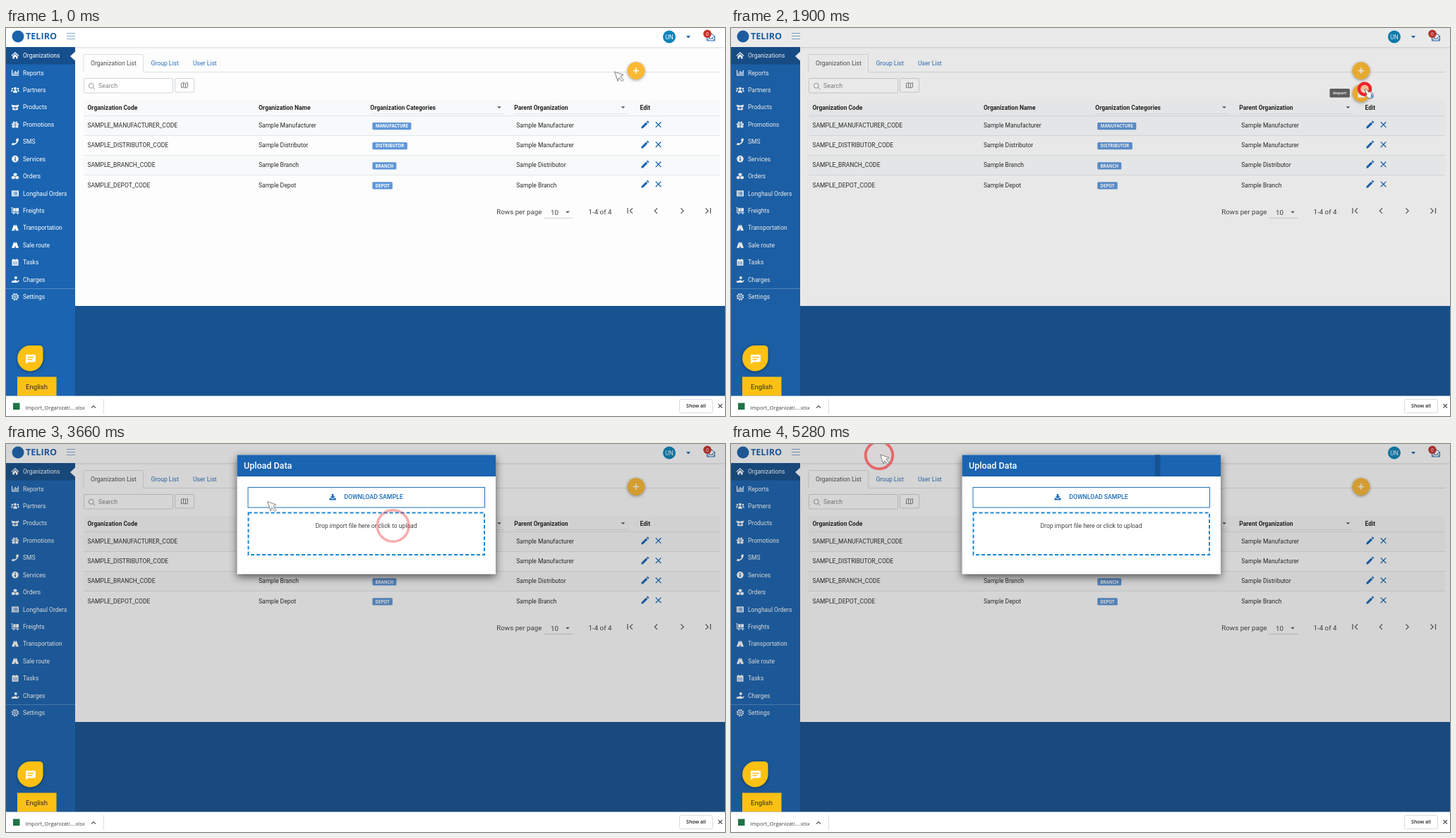
Write an HTML page that moves like this. It is 1019 by 550 pixels and loops after 5330 ms.

```html
<!DOCTYPE html>
<html lang="en">
<head>
<meta charset="utf-8">
<title>Organization import</title>
<style>
html, body { margin: 0; width: 100%; height: 100%; overflow: hidden; background: #fff; }
svg { display: block; width: 1019px; height: 550px; }
text { font: 8.5px Roboto, sans-serif; fill: #2b2b2b; white-space: pre; }
.bold { font-weight: 700; fill: #222; }
.white { fill: #fff; }
.link { fill: #2a70b8; }
.tag { font: 700 6.1px "Open Sans", sans-serif; fill: #fff; }
.page { font-size: 9.75px; fill: #444; }
.win { font: 7px "Open Sans", sans-serif; fill: #222; }
.soft { fill: #777; }
.mid { text-anchor: middle; }
.line { fill: none; stroke: #555; stroke-width: 1.2; }
.drop { filter: drop-shadow(0 1px 2px #0006); }

.loop { animation: 5330ms linear infinite; }
#cursor { animation-name: move; }
#arrow { animation-name: arrow; animation-timing-function: step-end; }
#hand { animation-name: hand; animation-timing-function: step-end; }
#plus { animation-name: plus; transform-origin: 893px 60.5px; }
#pen { animation-name: pen; transform-origin: 893px 60.5px; }
#fileBtn { animation-name: fileBtn; transform-origin: 893px 92.5px; }
#tip { animation-name: tip; transform-origin: 877px 92px; }
#shade { animation-name: shade; }
#modal { animation-name: modal; }
#modalHead { animation-name: head; animation-timing-function: step-end; }
#strip { animation-name: strip; animation-timing-function: step-end; }
#dialog { animation-name: dialog; transform-origin: 307px 171px; }
#lastClick { animation-name: lastClick; animation-timing-function: step-end; }
.ring { fill: #ffd0d0; stroke: #f0262c; opacity: 0; animation-name: ring; }

@keyframes move {
  0%, .75% { transform: translate(862px, 62px); animation-timing-function: ease-in-out; }
  10.69%, 21.39% { transform: translate(898px, 62px); animation-timing-function: ease-in-out; }
  25.89%, 37.9% { transform: translate(898px, 86px); animation-timing-function: ease-in; }
  43.71% { transform: translate(622px, 111px); animation-timing-function: ease-out; }
  48.03%, 63.41% { transform: translate(548px, 116px); animation-timing-function: ease-in; }
  68.67% { transform: translate(371px, 82px); animation-timing-function: ease-out; }
  73.17%, 100% { transform: translate(211px, 15px); }
}
@keyframes arrow { 0% { opacity: 1; } 6% { opacity: 0; } 39% { opacity: 1; } }
@keyframes hand { 0% { opacity: 0; } 6% { opacity: 1; } 39% { opacity: 0; } }
@keyframes plus {
  0%, 6.2% { opacity: 1; transform: none; }
  9%, 30.4% { opacity: 0; transform: rotate(45deg); }
  32.8%, 100% { opacity: 1; transform: none; }
}
@keyframes pen {
  0%, 6.2% { opacity: 0; transform: rotate(-45deg); }
  9%, 30.4% { opacity: 1; transform: none; }
  32.8%, 100% { opacity: 0; transform: rotate(-45deg); }
}
@keyframes fileBtn {
  0%, 8.5% { opacity: 0; transform: scale(0); }
  12.5%, 38% { opacity: 1; transform: none; }
  41%, 100% { opacity: 0; transform: scale(0); }
}
@keyframes tip {
  0%, 11.44% { opacity: 0; transform: scale(.4); }
  14.2%, 36.6% { opacity: 1; transform: none; }
  38.5%, 100% { opacity: 0; transform: scale(.4); }
}
@keyframes shade { 0%, 33.77% { opacity: 0; } 37.52%, 100% { opacity: 1; } }
@keyframes modal {
  0%, 37.5% { opacity: 0; transform: translateY(-42px); animation-timing-function: ease-out; }
  42.2%, 100% { opacity: 1; transform: none; }
}
@keyframes head { 0% { fill: #1a64b1; } 69.6% { fill: #1b6cc4; } 93.5% { fill: #1a64b1; } }
@keyframes strip { 0% { opacity: 0; } 94.6%, 100% { opacity: 1; } }
@keyframes dialog {
  0%, 69.6% { opacity: 0; transform: scale(.92); animation-timing-function: ease-out; }
  73.2%, 92.5% { opacity: 1; transform: none; animation-timing-function: ease-in; }
  96%, 100% { opacity: 0; transform: scale(.95); }
}
@keyframes ring {
  0% { r: 1.5px; stroke-width: 3px; opacity: 1; fill-opacity: .6; }
  6.19% { r: 8px; stroke-width: 4.6px; opacity: 1; fill-opacity: .6; }
  14.26% { r: 18.3px; stroke-width: 4px; opacity: .7; fill-opacity: .1; }
  18.2% { r: 22.3px; stroke-width: 3.6px; opacity: .38; fill-opacity: 0; }
  21.2%, 100% { r: 26px; stroke-width: 3.4px; opacity: 0; fill-opacity: 0; }
}
@keyframes lastClick { 0% { visibility: hidden; } 83.8%, 100% { visibility: visible; } }
</style>
</head>
<body>
<svg viewBox="0 0 1019 550">
  <defs>
    <path id="pencil" d="M-5 5V2.8L1.6-3.8L3.8-1.6L-2.8 5ZM2.3-4.5l1-1q.5-.5 1 0l1.2 1.2q.5.5 0 1l-1 1z"/>
    <path id="caret" d="M-2.8-1.3H2.8L0 1.5Z" fill="#555"/>
    <clipPath id="nav"><rect width="98" height="342"/></clipPath>
  </defs>

  <rect width="1019" height="550" fill="#fdfdfd"/>
  <rect x="98" y="394" width="921" height="128" fill="#175291"/>

  <!-- top bar -->
  <rect class="drop" width="1019" height="27" fill="#fff" style="filter:drop-shadow(0 1px 1px #0002)"/>
  <circle cx="17" cy="12" r="8.5" fill="#1b62ad"/>
  <text x="28" y="16.4" style="font:700 12.6px 'Open Sans',sans-serif;fill:#1b62ad">TELIRO</text>
  <path d="M86 7.5h12M86 11.5h12M86 15.5h12" stroke="#86abd2"/>
  <circle cx="940" cy="12.5" r="9" fill="#0b84bb"/>
  <text class="white mid" x="940" y="15.7">UN</text>
  <path d="M964 11h6l-3 3.4z" fill="#1b62ad"/>
  <path d="M993.5 11.5l5.5-4 5.5 4v6.5h-11zl5.5 4.3 5.5-4.3M993.5 18l4-4M1004.500 18l-4-4" fill="#fff" stroke="#1b62ad"/>
  <circle cx="994" cy="8.3" r="5.7" fill="#c62f2b"/>
  <text class="white mid" x="994" y="10.800" style="font-size:7px">0</text>

  <!-- side menu -->
  <rect y="27" width="98" height="495" fill="#1a64b1"/>
  <rect y="27" width="98" height="24.500" fill="#154f8e"/>
  <path d="M98.500 33l-7.500 7 7.500 7z" fill="#fdfdfd"/>
  <path d="M0 369.500h98" stroke="#4f8bc9"/>
  <g id="menu" fill="#fff" fill-rule="evenodd"></g>

  <!-- tabs and search -->
  <path d="M194.500 62.500H1012M110 62.500V39q0-1.500 1.500-1.500H193q1.500 0 1.500 1.500V62.500" fill="none" stroke="#dcdfe3"/>
  <text x="120" y="52.600" style="font-size:8.650px;fill:#495057">Organization List</text>
  <text class="link" x="205.500" y="52.600" style="font-size:8.650px">Group List</text>
  <text class="link" x="265" y="52.600" style="font-size:8.650px">User List</text>
  <rect x="110.500" y="71.500" width="126" height="20.500" rx="1.500" fill="#fff" stroke="#cfd4d9"/>
  <g fill="none" stroke="#999"><circle cx="120.800" cy="81.800" r="3.500"/><path d="M123.300 84.300l3 3"/></g>
  <text x="131" y="85" style="font-size:8.800px;fill:#858585">Search</text>
  <rect x="239.500" y="71.500" width="27" height="19.500" rx="1.500" fill="#fff" stroke="#cfd4d9"/>
  <path d="M248.500 78.500l3-1 3 1 3-1v6.500l-3 1-3-1-3 1zM251.500 77.500v6.500M254.500 78.500v6.500" fill="none" stroke="#777" stroke-width=".9"/>

  <!-- table -->
  <rect x="110" y="102" width="902" height="22" fill="#f8f9fa"/>
  <g class="bold">
    <text class="bold" x="115.500" y="115.600">Organization Code</text>
    <text class="bold" x="358" y="115.600">Organization Name</text>
    <text class="bold" x="516.300" y="115.600">Organization Categories</text>
    <text class="bold" x="720.300" y="115.600">Parent Organization</text>
    <text class="bold" x="898.500" y="115.600">Edit</text>
  </g>
  <path d="M516 121.500H706M720 121.500H882" stroke="#e6e6e6"/>
  <use href="#caret" x="699" y="112.500"/><use href="#caret" x="874.500" y="112.500"/>
  <g id="rows"></g>
  <path d="M110 124.500h902M110 152.500h902M110 180.500h902M110 208.500h902" stroke="#e2e6ea"/>

  <!-- pager -->
  <text class="page" x="695.300" y="263.500">Rows per page</text>
  <text class="page" x="772" y="264.600">10</text>
  <use href="#caret" x="796" y="261"/>
  <path d="M762 269.500h41" stroke="#d0d0d0"/>
  <text class="page" x="825.500" y="263.500">1-4 of 4</text>
  <path class="line" d="M881 255v8M888 255.500l-3.700 3.700 3.700 3.700M923 255.500l-3.700 3.700 3.700 3.700M956.500 255.500l3.700 3.700-3.700 3.700M991.500 255.500l3.700 3.700-3.700 3.700M998.500 255v8"/>

  <!-- floating buttons -->
  <g id="tip" class="loop">
    <rect x="848.500" y="86" width="28.500" height="12.500" rx="1.500" fill="#636363"/>
    <text class="tag mid" x="862.700" y="94.400" style="font-size:5.700px">Import</text>
  </g>
  <g id="fileBtn" class="loop">
    <circle class="drop" cx="893" cy="92.500" r="12.300" fill="#fbb832"/>
    <path d="M888.500 86.500h5.500l4 4v8h-9.500z" fill="#fff"/>
    <path d="M893.500 87v4h4" fill="none" stroke="#fbb832" stroke-width=".8"/>
  </g>
  <circle class="drop" cx="893" cy="60.500" r="12.300" fill="#fbb832"/>
  <path id="plus" class="loop" d="M888.800 60.500h8.400M893 56.300v8.400" stroke="#fff" stroke-width="1.500"/>
  <g id="pen" class="loop"><use href="#pencil" x="893" y="60.500" fill="#fff"/></g>

  <rect id="shade" class="loop" width="1019" height="522" fill="#262626" fill-opacity=".19"/>

  <!-- upload window -->
  <g id="modal" class="loop">
    <rect x="327.500" y="15.500" width="366.500" height="169" fill="#fefefe" style="filter:drop-shadow(0 4px 6px #0009)"/>
    <rect id="modalHead" class="loop" x="327.500" y="15.500" width="366.500" height="30.500"/>
    <rect id="strip" class="loop" x="601" y="15.500" width="7.500" height="30" fill="#175391"/>
    <text class="white" x="337" y="35" style="font-size:12.500px;font-weight:500">Upload Data</text>
    <rect x="343" y="61.500" width="335.500" height="28.500" fill="#fff" stroke="#1d74bd"/>
    <path d="M461.700 71h2.600v3.200h2.200l-3.500 3.400-3.500-3.400h2.200zM458.500 76.500h2l2.500 2 2.500-2h2v3h-9z" fill="#1a6cb8"/>
    <text class="link" x="479.300" y="78.300" style="font-size:8.700px;font-weight:500;fill:#1a6cb8">DOWNLOAD SAMPLE</text>
    <rect x="343.500" y="97.500" width="334.500" height="59.500" fill="#fff" stroke="#1a88d4" stroke-width="2" stroke-dasharray="5 3"/>
    <text class="mid" x="510.500" y="118.500" style="fill:#444">Drop import file here or click to upload</text>
  </g>

  <!-- file picker -->
  <g id="dialog" class="loop">
    <rect x="2.500" y="-40" width="610" height="382.500" fill="#fff" stroke="#555" style="filter:drop-shadow(1px 3px 5px #0008)"/>
    <rect x="3" y="37.500" width="95" height="14.500" fill="#d9d9d9"/>
    <path d="M98.500 0V296" stroke="#f1f1f1"/>
    <circle cx="22" cy="10.500" r="4.500" fill="#1a6fc9"/>
    <g fill="none" stroke="#888">
      <path d="M18.500 26.500h8v5.500h-8zM20 34h6M26.500 40v7M23.500 44.500l3 3 3-3M23 49h7"/>
      <path d="M23.500 55.500h6.500l1 4v4h-8.500v-4zM22.500 60h8.500M23.500 84.500h6.500l1 4v4h-8.500v-4zM22.500 89h8.500"/>
      <circle cx="26.500" cy="74" r="3" stroke-width="2.600"/>
      <circle cx="22" cy="108.500" r="4.200"/><path d="M18 108.500h8M22 104.500q-4 4 0 8q4-4 0-8"/>
      <path d="M18.500 123h7.500v9.500h-7.500z"/>
    </g>
    <g id="places" clip-path="url(#nav)"></g>
    <path d="M266.500 0v9M339.500 0v9M412.500 0v9M461.500 0v9" stroke="#e3e3e3"/>
    <rect x="108" y="12" width="351.500" height="13.500" fill="#e5f3fb"/>
    <rect x="111.500" y="14" width="9" height="9" fill="#1f7446"/>
    <g id="files"></g>
    <rect x="118.500" y="301.500" width="361" height="14" fill="#fff" stroke="#1a7bc9"/>
    <rect x="487" y="301.500" width="114.500" height="14" fill="#e3e3e3" stroke="#b0b0b0"/>
    <rect x="488" y="320" width="51.500" height="14" fill="#e1e1e1" stroke="#0f78d0" stroke-width="1.500"/>
    <rect x="548.500" y="320" width="52.500" height="14" fill="#e1e1e1" stroke="#b0b0b0"/>
    <path d="M471.500 307.500l2.500 2.500 2.500-2.500M593.500 307.500l2.500 2.500 2.500-2.500" fill="none" stroke="#555"/>
    <text class="win mid" x="513.500" y="329.500">Open</text>
    <text class="win mid" x="574.500" y="329.500">Cancel</text>
    <path d="M604 340.500h6M606.500 338h3.500M608.500 335.500h1.500" stroke="#aaa" stroke-dasharray="1.500 1"/>
  </g>

  <!-- chat and language -->
  <path d="M34.500 450H47q5.500 0 5.500 5.500V469A18.200 18.200 0 1 1 34.500 450z" fill="#fdc113" class="drop"/>
  <path d="M29 463h11q2 0 2 2v6.500q0 2-2 2h-8l-4 2.500v-11q0-2 1-2z" fill="#fff"/>
  <path d="M30.500 466.800h9M30.500 470h6.500" stroke="#fdc113" stroke-width="1.400"/>
  <rect x="16" y="494.500" width="55.500" height="27" fill="#fdc113"/>
  <text class="mid" x="43.600" y="511.700" style="font-size:9.600px">English</text>

  <!-- download bar -->
  <rect y="521.500" width="1019" height="29" fill="#fff"/>
  <rect x="10" y="531.500" width="9.500" height="9.500" fill="#1f7446"/>
  <text class="win" x="27.300" y="540.800" style="font-size:7.500px;fill:#444">Import_Organizati....xlsx</text>
  <path class="line" d="M121 538.500l3-3 3 3M1009.500 533l5.500 5.500M1015 533l-5.500 5.500"/>
  <path d="M138.500 526v21" stroke="#ddd"/>
  <rect x="954.500" y="526.500" width="47" height="19" rx="2" fill="#fff" stroke="#dadce0"/>
  <text class="win mid" x="978" y="538.300" style="font-weight:600">Show all</text>

  <!-- clicks and pointer -->
  <circle class="ring loop" cx="898" cy="86.500" style="animation-delay:1570ms"/>
  <circle class="ring loop" cx="548.500" cy="116" style="animation-delay:2690ms"/>
  <g id="lastClick" class="loop"><circle class="ring loop" cx="210" cy="16" style="animation-delay:4470ms"/></g>
  <g id="cursor" class="loop">
    <path id="arrow" class="loop" d="M.5 0L13 4.300 8.800 6.800 13 11.800 11 13.800 6.700 8.800 5 13.300z" fill="#f6f6f6" stroke="#777" stroke-width=".9" stroke-linejoin="round"/>
    <g id="hand" class="loop">
      <path d="M.3 1q1-1.500 2.300 0l3.200 4q3-2 5.500 1.500q1.500 2.500 .7 6l-4 1.800q-3.500-1-6.500-4.300q-.3-1.500 1.700-1z" fill="#fff" stroke="#555" stroke-width=".9" stroke-linejoin="round"/>
      <path d="M8.500 6.500q3.500 1.500 2.800 5.500l-3 1q1.500-3 .2-6.500z" fill="#1a9be0"/>
    </g>
  </g>
</svg>
<script>
const fill = (id, html) => document.getElementById(id).innerHTML = html;
const label = (x, y, s, cls = '') => `<text x="${x}" y="${y}" class="${cls}">${s}</text>`;
const disc = (x, y, r) => `M${x - r} ${y}a${r} ${r} 0 1 0 ${2 * r} 0a${r} ${r} 0 1 0 ${-2 * r} 0z`;
const box = (x, y, w, h) => `M${x} ${y}h${w}v${h}h${-w}z`;
const cube = (x, y) => `M${x} ${y - 2.2}l2.400 1v2.400l-2.400 1.100-2.400-1.100v-2.400z`;

const road = 'M-2-4h1.600v2h.8v-2h1.600L5 4H.7V1.500H-.7V4H-5z';
const menu = [
  ['Organizations', 'M-5.500 0L0-5 5.500 0 4.700 1 0-3.200-4.700 1zM-3.600 1.300L0-2 3.600 1.300V4.500H1V2H-1V4.500H-3.600z'],
  ['Reports', 'M-5-4h1.200v6.800h9V4H-5z' + box(-2.5, 0, 1.4, 2) + box(-.4, -2.5, 1.4, 4.5) + box(1.7, -1, 1.4, 3) + box(3.700, -3.5, 1.2, 5.5)],
  ['Partners', disc(0, -2.2, 1.9) + disc(-4, -1.8, 1.3) + disc(4, -1.8, 1.3) + 'M-3 4c0-5 6-5 6 0zM-5.800 2.500c0-2.500 1-3 2.500-2.500l-.8 2.500zM5.800 2.500c0-2.500-1-3-2.500-2.500l.8 2.500z'],
  ['Products', 'M-5.500-3.500L0-2.500 5.500-3.500 4.200 0 1 .5 0-1.200-1 .5-4.200 0zM-4 1L-.4 1.600V4.500L-4 3.500zM4 1L.4 1.600V4.500L4 3.500z'],
  ['Promotions', box(-5, -1.5, 4.5, 2.2) + box(.5, -1.5, 4.5, 2.2) + box(-4.3, 1.3, 3.8, 3.2) + box(.5, 1.3, 3.8, 3.2) + 'M-3-2c-1-3 2-3 3-.5c1-2.500 4-2.500 3 .5z'],
  ['SMS', 'M2.500-4.800l2.500.6c0 5-4.500 9.200-9.300 9.200l-.7-2.200 2.700-1.300 1.200 1.200c1.500-.8 2.600-2 3.200-3.400l-1.200-1.200z'],
  ['Services', disc(0, 0, 4.8) + box(-.8, -.9, 1.6, 3.8) + box(-.8, -3, 1.6, 1.4)],
  ['Orders', cube(0, -2.2) + cube(-2.7, 2) + cube(2.7, 2)],
  ['Longhaul Orders', box(-5, -4, 10, 8) + [-2.3, -.4, 1.5].map(y => box(-3.6, y, 1.2, 1) + box(-1.5, y, 5, 1)).join('')],
  ['Freights', 'M-5.800-4.500h2v7h9.300v1h-10.300v-7h-1z' + box(-2.8, -3.5, 3.4, 5) + box(1.2, -3.5, 3.8, 5) + disc(-2, 4.2, 1) + disc(3.5, 4.2, 1)],
  ['Transportation', road],
  ['Sale route', road],
  ['Tasks', box(-4.5, -3.8, 9, 8.3) + box(-2.8, -5, 1.3, 1.2) + box(1.5, -5, 1.3, 1.2) + [-1, 1.5].map(y => [-3, -.7, 1.600].map(x => box(x, y, 1.4, 1.4)).join('')).join('')],
  ['Charges', 'M-5 2h2l2-1h3v1.200h1l2.200-1.400.8.8-3 2.700h-8z' + disc(.8, -2.5, 2)],
  ['Settings', '']
];
const gear = '<g fill="none" stroke="#fff"><circle r="4.400" stroke-width="1.500" stroke-dasharray="1.900 1.560"/><circle r="3.500" stroke-width=".9"/><circle r="1.400" stroke-width=".9"/></g>';
fill('menu', menu.map(([name, d], i) => {
  const y = 39 + i * 24.43;
  return `<g transform="translate(13 ${y})">${d ? `<path d="${d}"/>` : gear}</g>` + label(24, y + 3.1, name, 'white');
}).join(''));

const rows = [
  ['Manufacturer', 'MANUFACTURE', 55, 'Manufacturer'],
  ['Distributor', 'DISTRIBUTOR', 49.5, 'Manufacturer'],
  ['Branch', 'BRANCH', 34, 'Distributor'],
  ['Depot', 'DEPOT', 28.5, 'Branch']
];
fill('rows', rows.map(([name, tag, w, parent], i) => {
  const y = 138 + i * 28.1;
  return `<rect x="110" y="${124.500 + i * 28}" width="902" height="28" fill="${i % 2 ? '#fdfdfd' : '#f8f9fa'}"/>
    ${label(115.500, y + 3.2, `SAMPLE_${name.toUpperCase()}_CODE`)}
    ${label(358, y + 3.2, 'Sample ' + name)}
    <rect x="519.300" y="${y - 4}" width="${w}" height="10.200" rx="1.500" fill="#5e96d8"/>
    ${label(519.300 + w / 2, y + 3.3, tag, 'tag mid')}
    ${label(723.300, y + 3.2, 'Sample ' + parent)}
    <use href="#pencil" x="905.500" y="${y - .7}" fill="#1a66b3"/>
    <path d="M920.800 ${y - 4.700}l7.600 7.600m0-7.600l-7.600 7.600" stroke="#1a66b3" stroke-width="1.300"/>`;
}).join(''));

const places = [
  [30, 10.5, 'KeptDisk'], [30, 30, 'This PC'], [35, 44.5, 'Downloads'], [35, 59, 'Local Disk (C:)'],
  [35, 73.5, 'DVD RW Drive (D:) Files'], [35, 88.5, 'Data (E:)'], [30, 108, 'Network'], [30, 127.5, 'Nam Vey']
];
fill('places', places.map(([x, y, s]) => label(x, y + 2.6, s, s === 'Downloads' ? 'win' : 'win soft')).join(''));

const cells = [
  [111, 4, 'Name', 1], [270, 4, 'Date modified', 1], [343.5, 4, 'Type', 1], [417, 4, 'Size', 1],
  [123.500, 21.3, 'Import_Organizations_Template (1)'], [270, 21.3, '05/06/2019 10:53', 1],
  [343.5, 21.3, 'Belmarant Sheet W...', 1], [439, 21.3, '10 KB', 1],
  [82, 311.2, 'File name:', 1], [489.500, 311.2, 'All Files']
];
fill('files', cells.map(([x, y, s, soft]) => label(x, y, s, soft ? 'win soft' : 'win')).join(''));
</script>
</body>
</html>
```
